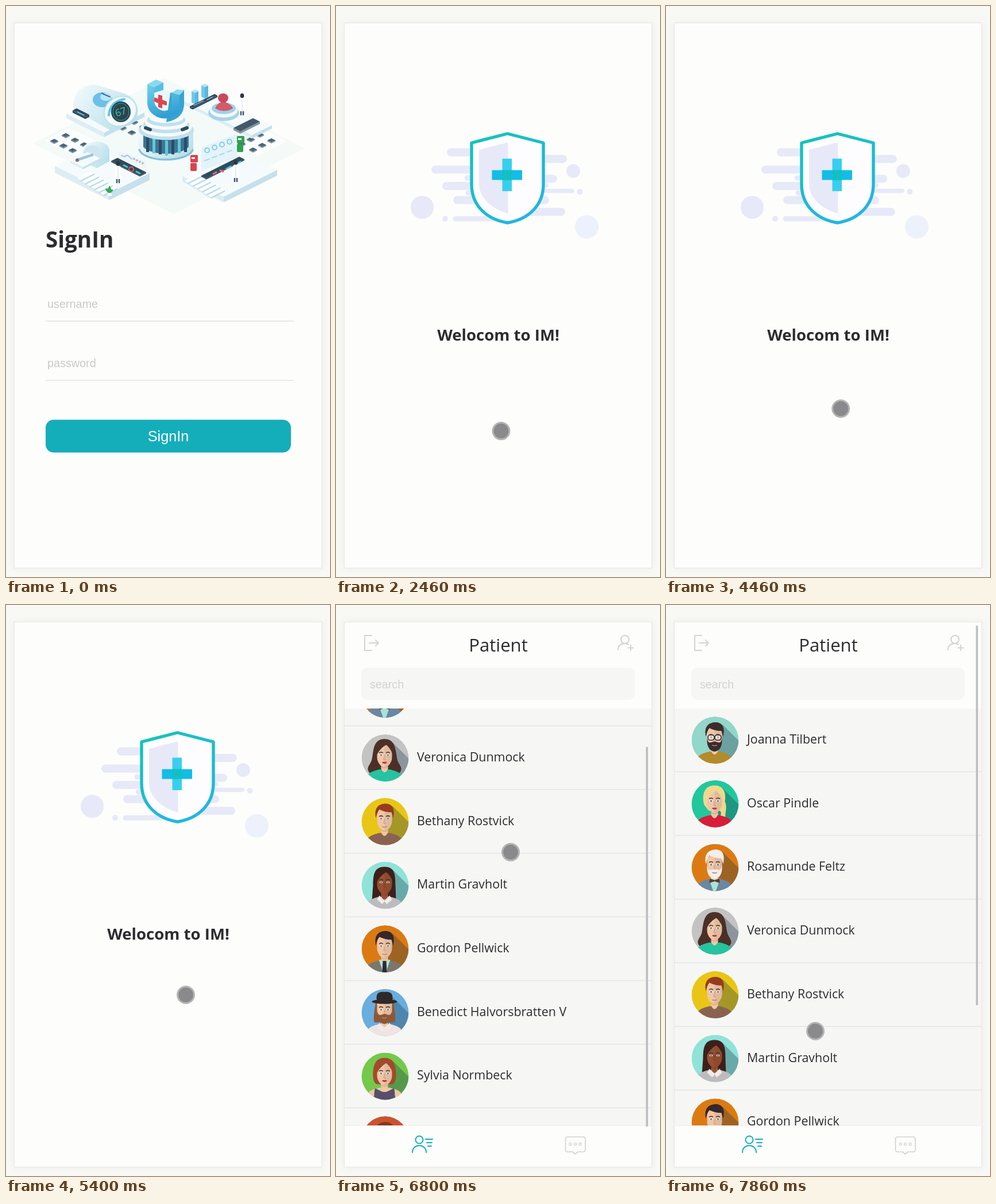
Recreate the animation shown at these times as an HTML page. Size 564 by 993 pixels, loop 8 s.

```html
<!DOCTYPE html>
<html lang="en">
<head>
<meta charset="utf-8">
<title>Sign in</title>
<style>
html, body { margin: 0; width: 100%; height: 100%; overflow: hidden; background: #f8f8f5; }
svg { display: block; width: 564px; height: 993px; }
.ui { font-family: "Open Sans", "Noto Sans", sans-serif; fill: #2c2c30; }
.form { font-family: "Liberation Sans", Arial, sans-serif; }
.line { fill: none; stroke-linecap: round; stroke-linejoin: round; }
#panel { filter: drop-shadow(0 0 6px #0000000d); }
</style>
</head>
<body>
<svg id="stage" viewBox="0 0 564 993" xmlns="http://www.w3.org/2000/svg"></svg>
<script>
const oval = (fill, x, y, rx, ry = rx, more = '') =>
  `<ellipse cx="${x}" cy="${y}" rx="${rx}" ry="${ry}" fill="${fill}" ${more}/>`;
const ring = (color, width, x, y, rx, ry = rx) =>
  oval('none', x, y, rx, ry, `stroke="${color}" stroke-width="${width}"`);
const rect = (fill, x, y, w, h, r = 0) =>
  `<rect x="${x}" y="${y}" width="${w}" height="${h}" rx="${r}" fill="${fill}"/>`;
const path = (fill, d) => `<path d="${d}" fill="${fill}"/>`;
const line = (color, width, d) =>
  `<path class="line" d="${d}" stroke="${color}" stroke-width="${width}"/>`;
const text = (cls, x, y, size, str, more = '') =>
  `<text class="${cls}" x="${x}" y="${y}" font-size="${size}" ${more}>${str}</text>`;
const repeat = (n, fn) => Array.from({ length: n }, (_, i) => fn(i)).join('');

const TEAL = '#14aebb', GREY = '#d3d3d3', DARK = '#2f4b5c', PALE = '#e7e9f8';
const PAPER = '#fdfdfb', WASH = '#f6f7f4';

// ---- isometric clinic on the sign-in page ----
// A box hangs from its back corner; u runs down-right, v runs down-left.
function box(x, y, u, v, h = 0, top = '#f5fbfc', left = '#dcedf4', right = '#c6e0ec') {
  const fx = x + u - v, fy = y + (u + v) / 2;
  return path(left, `M${x - v} ${y + v / 2}L${fx} ${fy}v${h}L${x - v} ${y + v / 2 + h}Z`) +
    path(right, `M${x + u} ${y + u / 2}L${fx} ${fy}v${h}L${x + u} ${y + u / 2 + h}Z`) +
    path(top, `M${x} ${y}l${u} ${u / 2}L${fx} ${fy}L${x - v} ${y + v / 2}Z`);
}

// Two lanes of dark pads on a pale road.
const pads = (x, y, n, side) => repeat(n * 2, i => {
  const k = i >> 1, lane = i % 2 * 20;
  return box(x + k * 16 * side + lane * side, y + k * 8 - lane / 2, 7, 7, 2, '#4c6574', '#7d95a3', '#7d95a3');
});

const stairs = (x, y) => repeat(6, i => box(x + i * 8, y + i * 5, 6, 24, 3, '#fbfefe', '#d8ebf3', '#bcdbea'));

const medic = (x, y) =>
  line('#46566a', 2.5, `M${x - 2} ${y + 10}v9m4 -9v9`) +
  path('#fff', `M${x - 5} ${y - 8}q5 -5 10 0l1 21h-12Z`) +
  line('#cbdde6', 1, `M${x} ${y - 7}v19`) + oval('#2e3440', x, y - 14, 3.4, 4);

const robot = (x, y, color) =>
  rect(color, x - 6, y - 15, 13, 13, 2) + rect(color, x - 6, y - 1, 11, 14, 2) +
  rect('#fff', x - 4, y - 11, 6, 3);

function clinic() {
  const ground = box(275, 125, 245, 228, 0, '#f3faf8') +
    box(110, 212, 60, 44, 0, '#fbfefe') + box(456, 218, 34, 52, 0, '#fbfefe') +
    pads(84, 231, 3, 1) + pads(203, 208, 2, 1) + pads(462, 230, 3, -1);

  const scanner = box(175, 152, 66, 70, 8) +
    path('url(#shell)', 'M118 181C112 152 136 132 160 138L205 152C232 161 238 192 216 207L182 216Z') +
    oval('#6cc0e6', 168, 163, 17, 13) + oval('#b9e6f5', 174, 158, 10, 7) + line('#3d6f92', 2, 'M167 152L181 158') +
    oval('#f2fafc', 199, 183, 29, 25, 'stroke="#bfe0ea" stroke-width="2" transform="rotate(-30 199 183)"') +
    line('#5fc6ea', 4, 'M179 190C180 174 190 165 206 162') +
    oval('#2a4450', 200, 184, 17, 18) + ring('#2fa89c', 1, 200, 184, 14, 15) +
    text('ui', 190, 190, 17, '67', 'style="fill:#45cda8" transform="rotate(-18 200 184)"') +
    box(123, 178, 22, 7, 4, DARK, DARK, DARK) + line('#6fd0de', 1.5, 'M124 184l12 6');

  const lab = box(345, 148, 118, 35, 6) +
    repeat(2, i => box(329 + i * 17, 145 - i * 10, 6, 6, 20, '#b4e4f5', '#74c8ea', '#5ab8e0')) +
    box(363, 153, 5, 43, 3, DARK, DARK, DARK) + line('#8fd7df', 1.2, 'M327 173l17 -8M350 163l10 -5') +
    box(430, 195, 12, 34, 4, '#43596a', '#7d95a3', '#7d95a3') +
    repeat(3, i => oval(['#a9d3e6', '#f0f9fc', '#9fd2ea'][i], 379, 186 - i * 4, 27 - i * 3, 14 - i * 2)) +
    path('#d25a6b', 'M364 178q3 -8 11 -11h7q10 4 13 11q-15 9 -31 0Z') + oval('#c9485c', 378, 160, 9, 8) + medic(411, 170);

  const tower = path('url(#shell)', 'M231 216V252A48 20 0 0 0 326 252V216Z') +
    line('#86bed6', 3, 'M232 250A47 20 0 0 0 325 250') +
    path('#3f7594', 'M239 221V245A42 18 0 0 0 318 245V221Z') +
    repeat(7, i => rect(i % 2 ? '#5fc9d8' : '#294d68', 244 + i * 11, 234 - Math.abs(i - 3) * 2, 5, 26)) +
    repeat(6, i => oval(i % 2 ? '#f5fbfc' : '#c2e0ec', 279, 216 - i * 4.4, 48 - i * 3.6, 17 - i * 1.5)) +
    line(DARK, 6, 'M243 212l8 3M307 215l8 -3') +
    path('#e9f6fa', 'M255 141l37 11v26l-16 10l-19 -10Z') +
    path('#35a3d3', 'M286 151l24 -5v24q0 26 -31 32Z') +
    path('url(#arch)', 'M246 136l12 5v23C258 183 286 190 288 171v-20l14 4v19C300 207 246 200 246 168Z') +
    path('#8bd9ee', 'M246 136l15 -8l13 5l-16 8ZM288 151l10 -6l12 2l-8 8Z') + path('#55bfe3', 'M258 141l16 -8v13l-16 5Z') +
    path('#dd4650', 'M265 154l7 2v7l8 3v7l-8 -2v7l-7 -2v-7l-7 -3v-7l7 2Z');

  const left = box(155, 243, 95, 70, 12) + stairs(148, 288) +
    path('url(#shell)', 'M133 270V250C133 233 181 229 180 252V270L158 282Z') + oval('#cfe6ef', 150, 256, 15, 14) +
    box(142, 254, 22, 30, 4) + line('#9fc6df', 5, 'M126 267l24 -8') + oval('#7a706f', 124, 268, 3) +
    path('#ecf5f9', 'M196 252l47 18v14l-47 -20Z') + line('#a4c5ed', 2, 'M201 260l6 2l4 -3l8 7') +
    repeat(4, i => oval(i % 2 ? '#eeaaa2' : '#9ec3ee', 223 + i * 5, 266 + i * 2.5, 2)) +
    box(194, 264, 50, 11, 2, DARK, DARK, DARK) + line('#49c8c2', 3, 'M205 277l6 3M227 288l6 3') + ring('#df5966', 2, 218, 284, 4) +
    medic(195, 288) + path('#37a857', 'M180 327q-13 -12 -2 -9q2 -11 5 1q8 -1 -3 8Z') + rect('#fff', 177, 325, 7, 5, 2);

  const right = box(400, 249, 72, 93, 10) + stairs(335, 292) +
    path('#e3f3f9', 'M340 246l63 -24v40l-63 25Z') +
    repeat(4, i => ring('#82cce9', 2, 350 + i * 13, 251 - i * 5, 4) + line('#abd8e8', 2, `M${346 + i * 13} ${269 - i * 5}l8 -3`)) +
    box(406, 262, 9, 66, 2, DARK, DARK, DARK) +
    line('#e46d73', 3, 'M361 292l5 -3M373 286l5 2') + line('#5ac4db', 3, 'M384 283l7 -4M404 273l4 -2') +
    robot(327, 274, '#d8434f') + robot(408, 241, '#33a052') + medic(400, 286);

  return ground + lab + scanner + tower + left + right;
}

// ---- pages ----
const field = (y, label) =>
  text('form', 72, y, 19.8, label, 'fill="#c9c9c9"') + rect('#d8d8da', 69, y + 22.5, 432, 1);

const signIn = clinic() +
  text('ui', 69, 420, 38.6, 'SignIn', 'font-weight="700"') +
  field(525, 'username') + field(628, 'password') +
  rect(TEAL, 69, 719.5, 427, 57, 14) +
  text('form', 282.5, 756.5, 25.2, 'SignIn', 'fill="#fff" text-anchor="middle"');

const welcome =
  line(PALE, 14, 'M200 254.5H240M173 284.5H240M192 313H240M211 337.5H250M350 266H395M350 300.5H378M350 337.5H364M335 358H392') +
  line(PALE, 9, 'M208 370H280M228 299H240M230 325H240') + line(PALE, 7.5, 'M350 321.5H411M355 312H366') +
  oval(PALE, 150, 350, 20) + oval(PALE, 190, 370, 5) + oval(PALE, 413, 287, 12) +
  oval(PALE, 424.5, 323, 5) + oval('#edf1fb', 436.5, 384, 20.5) +
  `<path d="M298.5 222L361 238V310C361 347 335 371 298.5 377C262 371 236 347 236 310V238Z"
    fill="#fdfdff" stroke="url(#rim)" stroke-width="5.4" stroke-linejoin="round"/>` +
  path(PALE, 'M299.5 237L249 250V308C249 335 271 353 299.5 361Z') +
  rect('#38cfee', 289.5, 265.5, 16.5, 56.5) + rect('#12bde6', 271.5, 285.5, 52.5, 17) + rect('#12c0c4', 289.5, 285.5, 16.5, 17) +
  text('ui', 282.5, 581.5, 27.6, 'Welocom to IM!', 'font-weight="700" text-anchor="middle"');

// ---- patients ----
const people = [
  { name: 'Joanna Tilbert', bg: '#93d6ca', hair: '#3a2c2c', top: '#b38b2a', beard: 1, glasses: 1 },
  { name: 'Oscar Pindle', bg: '#22c79c', hair: '#eed98e', top: '#d71d3a', long: 'tail' },
  { name: 'Rosamunde Feltz', bg: '#dc7a12', hair: '#f1eeec', top: '#6a87a3', beard: 1, suit: 'bow' },
  { name: 'Veronica Dunmock', bg: '#c3c3c3', hair: '#4a3026', top: '#25c39f', long: 'wavy' },
  { name: 'Bethany Rostvick', bg: '#e9c616', hair: '#963c1c', top: '#8a6350' },
  { name: 'Martin Gravholt', bg: '#8fe3d9', hair: '#3d201c', top: '#bcbcbe', long: 'straight', skin: '#96512f', collar: 1 },
  { name: 'Gordon Pellwick', bg: '#dc7a12', hair: '#35272b', top: '#7b776f', suit: 'tie' },
  { name: 'Benedict Halvorsbratten V', bg: '#69aede', hair: '#8d5836', top: '#efe4e3', long: 'loose', hat: 1, beard: 1, collar: 1 },
  { name: 'Sylvia Normbeck', bg: '#74c94b', hair: '#a44a2a', top: '#55506b', long: 'bob', bare: 1 },
  { name: 'Wilhelmina LaFosque', bg: '#c9532f', hair: '#893820', top: '#8a6350' }
];

const longHair = {
  wavy: 'M0 -33C-20 -33 -19 -12 -22 2C-24 12 -33 16 -27 25C-18 32 -9 27 -7 20H7C9 27 18 32 27 25C33 16 24 12 22 2C19 -12 20 -33 0 -33Z',
  straight: 'M0 -32C-17 -32 -20 -20 -20 0L-22 27H20L19 0C19 -20 17 -32 0 -32Z',
  bob: 'M0 -32C-18 -32 -20 -15 -20 -2C-20 8 -17 15 -10 14H10C17 15 20 8 20 -2C20 -15 18 -32 0 -32Z',
  tail: 'M0 -32C-20 -32 -22 -12 -18 2L-10 12H8C16 14 6 24 13 31L21 28C15 20 24 8 18 -4C21 -20 15 -32 0 -32Z',
  loose: 'M-15 -22C-17 -4 -20 6 -18 17H18C20 6 17 -4 15 -22Z'
};

function face(p) {
  const skin = p.skin || '#f0c6a6', woman = p.long && !p.hat;
  let s = path('#17324a52', 'M14 -27L50 9V45H0Z');
  if (p.long) s += path(p.hair, longHair[p.long]);
  s += path(p.bare ? skin : p.top, 'M-33 42C-32 26 -22 23 -9 20H9C22 23 32 26 33 42Z');
  if (p.bare) s += path(p.top, 'M-22 42C-15 34 -20 28 -16 21L-8 25Q0 30 8 25L16 21C20 28 15 34 22 42Z');
  if (p.suit) s += path('#a9e4d4', 'M-10 19H10L2 42H-2Z');
  s += path(skin, 'M-6 6H6V19Q0 31 -6 19Z') + path('#00000018', 'M-6 11H6V16Q0 21 -6 16Z') +
    path(skin, 'M-13 -16Q0 -30 13 -16V-1C13 8 6 16 0 16C-6 16 -13 8 -13 -1Z') +
    path('#00000010', 'M0 -24Q10 -22 13 -16V-1C13 8 6 16 0 16Z');
  if (p.suit === 'bow') s += path('#5b3b34', 'M-9 19L0 22L9 19V27L0 24L-9 27Z');
  if (p.suit === 'tie') s += path('#2d2a33', 'M-3 21H3L4 42H-4Z');
  if (p.collar) s += path('#f0ebe8', 'M-9 18L0 27L9 18L13 25L4 33L0 28L-4 33L-13 25Z');
  if (p.beard) s += path(p.hair, 'M-13 -3Q-11 6 -6 4Q0 1 6 4Q11 6 13 -3C14 12 8 19 0 20C-8 19 -14 12 -13 -3Z');
  if (p.hat) s += rect('#2f2928', -14, -36, 28, 20, 9) + oval('#2f2928', 0, -19, 22, 4);
  else if (woman) s += path(p.hair, 'M-16 2C-18 -20 -10 -29 2 -29C14 -28 18 -14 16 2Q14 -13 3 -23Q-12 -14 -16 2Z');
  else s += path(p.hair, 'M-15 -6C-19 -24 -10 -30 0 -31C13 -32 19 -23 15 -6L12 -16Q0 -16 -9 -21Q-13 -16 -15 -6Z');
  for (const x of [-6, 6]) {
    s += line('#493128', 1.5, `M${x - 3} -9q3 -2 6 0`) + oval('#fff', x, -5, 2.8, 1.7) + oval('#4d6b78', x, -5, 1.5);
    if (p.glasses) s += `<rect x="${x - 5.5}" y="-9" width="11" height="9" rx="4" fill="#ffffff50" stroke="#333238" stroke-width="1.6"/>`;
  }
  s += line('#00000030', 1.2, 'M0 -4l-1.5 7h3');
  return s + (woman ? path('#c02e48', 'M-4.5 8Q-2 6 0 7Q2 6 4.5 8Q0 12 -4.5 8Z') : line('#c9787a', 1.6, 'M-3.5 9q3.5 1.5 7 0'));
}

const rows = people.map((p, i) => `<g transform="translate(0 ${i * 110.7})">
  <g transform="translate(85.5 235)" clip-path="url(#disc)">${oval(p.bg, 0, 0, 41)}<g transform="translate(-1 0)">${face(p)}</g></g>
  ${text('ui', 141, 241, 21.4, p.name)}${rect('#dcdde2', 15, 289.5, 534, 1)}</g>`).join('');

const patients = rect(WASH, 15, 180, 534, 725.5) +
  `<g clip-path="url(#view)"><g id="rows">${rows}</g></g>` +
  line(GREY, 2, 'M62 53H50V79H62M58 66H74M69 61l5 5l-5 5') +
  ring(GREY, 2, 503, 60, 7) +
  line(GREY, 2, 'M491 78C491 70 496 67 503 67Q507 67 509 69M513 70v9M508.5 74.5h9') +
  text('ui', 282.5, 80.5, 31.1, 'Patient', 'text-anchor="middle"') +
  rect(WASH, 44, 109, 476, 56, 10) + text('form', 59, 145, 19.7, 'search', 'fill="#d2d2d2"') +
  rect('#eeeeee', 15, 905, 534, 1) +
  ring(TEAL, 2, 145, 930, 6.5) +
  line(TEAL, 2, 'M133 952C133 936 157 936 157 952M156 929h12M158 935h9M160 941h6') +
  line(GREY, 1.7, 'M403 925h27q4 0 4 4v18q0 4 -4 4h-9l-4.5 4l-4.5 -4h-9q-3.5 0 -3.5 -4v-18q0 -4 3.5 -4Z') +
  repeat(3, i => ring(GREY, 1.3, 408 + i * 8.5, 937.5, 2.1)) +
  `<rect id="thumb" x="539.5" width="3.6" height="660" fill="#bebebf"/>`;

const grad = (id, a, b, dir) => `<linearGradient id="${id}" ${dir}><stop stop-color="${a}"/><stop offset="1" stop-color="${b}"/></linearGradient>`;
const $ = id => document.getElementById(id);
$('stage').innerHTML = `<defs>
  ${grad('shell', '#f5fbfc', '#b8e0ea', 'x2="1" y2=".6"')}${grad('arch', '#6fd2ea', '#329fd2', 'x2=".3" y2="1"')}
  ${grad('rim', '#14c4b8', '#22b6e2', 'x2=".5" y2="1" spreadMethod="reflect"')}
  <clipPath id="disc"><circle r="41"/></clipPath><clipPath id="view"><rect x="15" y="180" width="534" height="725"/></clipPath>
  </defs>
  <rect id="panel" x="14.5" y="29.5" width="535" height="948" fill="${PAPER}" stroke="#e6e6e6"/>
  <g id="signIn">${signIn}</g><g id="welcome">${welcome}</g><g id="patients">${patients}</g>
  <g id="touch">${oval('#a9aaa8', 0, 0, 16, 16, 'opacity=".85"')}${oval('#858588', 0, 0, 13, 13, 'opacity=".9"')}</g>`;

// ---- motion ----
const LOOP = 8000, SPLASH = 2400, LIST = 5600, DRAG = 6400, PULL = 7400, MAX = 380;

// Touch point: time, x, y
const track = [[860, 330, 960], [1460, 281, 708], [2000, 284, 746], [3460, 295, 724], [5400, 313, 678],
  [DRAG, 304, 731], [6995, 304, 283], [PULL, 304, 283], [7860, 260, 741], [LOOP, 260, 741]];

function touchAt(t) {
  const i = Math.max(1, track.findIndex(k => k[0] >= t));
  const [t0, x0, y0] = track[i - 1], [t1, x1, y1] = track[i];
  const k = (t - t0) / (t1 - t0);
  return [x0 + (x1 - x0) * k, y0 + (y1 - y0) * k];
}

const clamp = v => Math.max(0, Math.min(MAX, v));
const show = (id, on) => { $(id).style.display = on ? '' : 'none'; };

// The picture is refreshed at uneven 60 / 140 ms intervals.
function tick(t) {
  const base = Math.floor(t / 200) * 200;
  return t - base < 60 ? base : base + 60;
}

function draw(now) {
  const t = tick(now % LOOP);
  const [x, y] = touchAt(t);
  const scroll = t < DRAG ? 0 : clamp(t < PULL ? 731 - y : MAX + 283 - y);
  show('signIn', t < SPLASH);
  show('welcome', t >= SPLASH && t < LIST);
  show('patients', t >= LIST);
  show('thumb', t >= DRAG);
  show('touch', t >= track[0][0]);
  $('rows').setAttribute('transform', `translate(0 ${-scroll})`);
  $('thumb').setAttribute('y', 36 + scroll * 0.7);
  $('touch').setAttribute('transform', `translate(${x} ${y})`);
}

const start = performance.now();
function loop() {
  draw(performance.now() - start);
  requestAnimationFrame(loop);
}
loop();
</script>
</body>
</html>
```
